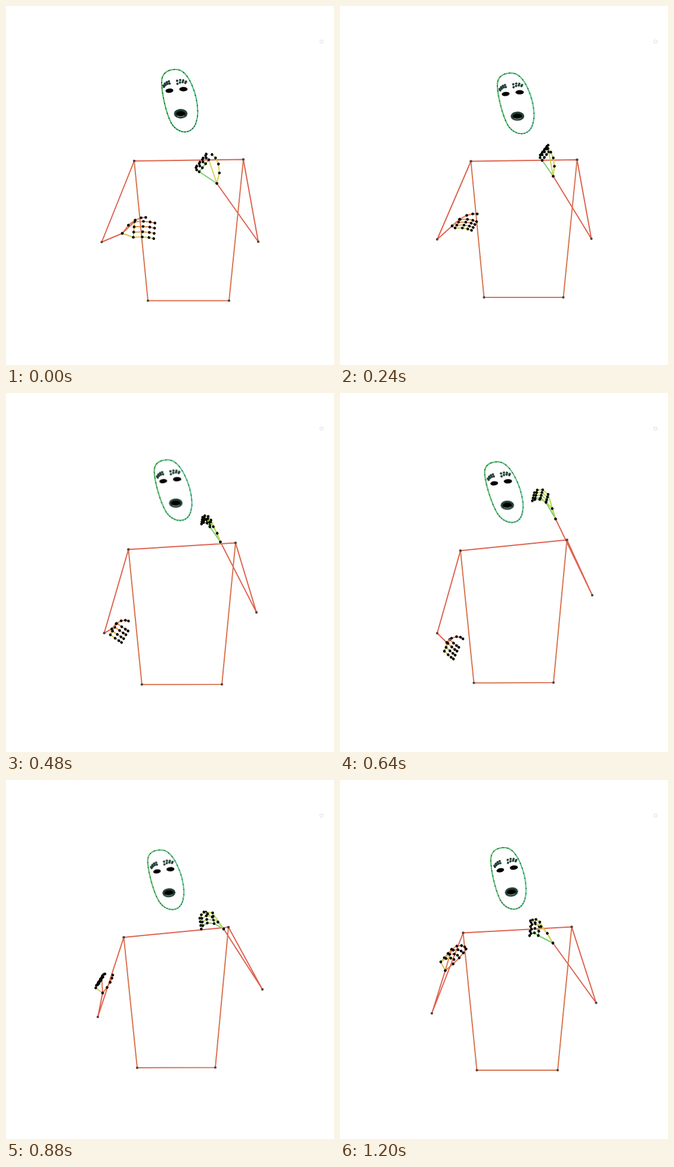
Recreate the animation shown at these times as an HTML page without scripts. Size 550 by 600 pixels, loop 1.28 s.

```html
<!DOCTYPE html>
<html lang="en">
<head>
<meta charset="utf-8">
<title>Signing pose</title>
<style>
html, body { margin: 0; width: 100%; height: 100%; overflow: hidden; background: #fff; }
svg { display: block; width: 550px; height: 600px; }
path { fill: none; stroke-width: 2; stroke-linejoin: round; }

/* Hand rig: wrist, index and pinky knuckles (from the wrist),
   then angle, bend per joint and bone length of fingers and thumb. */
@property --wx { syntax: "<number>"; inherits: true; initial-value: 0; }
@property --wy { syntax: "<number>"; inherits: true; initial-value: 0; }
@property --ix { syntax: "<number>"; inherits: true; initial-value: 0; }
@property --iy { syntax: "<number>"; inherits: true; initial-value: 0; }
@property --px { syntax: "<number>"; inherits: true; initial-value: 0; }
@property --py { syntax: "<number>"; inherits: true; initial-value: 0; }
@property --fa { syntax: "<number>"; inherits: true; initial-value: 0; }
@property --fb { syntax: "<number>"; inherits: true; initial-value: 0; }
@property --fl { syntax: "<number>"; inherits: true; initial-value: 0; }
@property --ta { syntax: "<number>"; inherits: true; initial-value: 0; }
@property --tb { syntax: "<number>"; inherits: true; initial-value: 0; }
@property --tl { syntax: "<number>"; inherits: true; initial-value: 0; }
@property --turn { syntax: "<number>"; inherits: true; initial-value: 0; }

.hand { transform: translate(calc(var(--wx) * 1px), calc(var(--wy) * 1px)); }
.palm { transform: matrix(var(--ix), var(--iy), var(--px), var(--py), 0, 0); stroke: currentColor; vector-effect: non-scaling-stroke; }
.finger {
  --len: var(--fl); --bend: var(--fb);
  transform:
    translate(calc((var(--ix) * (1 - var(--t)) + var(--px) * var(--t)) * 1px),
              calc((var(--iy) * (1 - var(--t)) + var(--py) * var(--t)) * 1px))
    rotate(calc(var(--fa) * 1deg));
}
.thumb { --len: var(--tl); --bend: var(--tb); transform: rotate(calc(var(--ta) * 1deg)); }
.joint { transform: translate(calc(var(--len) * var(--m) * 1px), 0px) rotate(calc(var(--bend) * 1deg)); }
.bone { y: -1px; height: 2px; width: calc(var(--len) * var(--n) * 1px); fill: currentColor; }
.dot { r: 2.3px; fill: #060606; }
.tip { cx: calc(var(--len) * var(--n) * 1px); }

/* Motion runs between key poses; steps hold every 80 ms. */
.left { color: #de8a52; animation: left 1.28s infinite; }
.right { color: #d9cf58; animation: right 1.28s infinite, tint 1.28s steps(8) infinite; }
@keyframes left {
  0% { --wx: 195; --wy: 380; --ix: 20.5; --iy: -19.5; --px: 18.5; --py: 6.5; --fa: -2; --fb: 7; --fl: 15; --ta: -53; --tb: 16; --tl: 14.2; animation-timing-function: steps(3); }
  18.75% { --wx: 188; --wy: 367.5; --ix: 13.5; --iy: -11; --px: 5; --py: 3.5; --fa: 0; --fb: 10; --fl: 12.2; --ta: -42; --tb: 14; --tl: 13.8; animation-timing-function: steps(2); }
  31.25% { --wx: 176.5; --wy: 383; --ix: 10.5; --iy: -11.5; --px: -1.5; --py: 7.5; --fa: 31; --fb: 0; --fl: 10.4; --ta: -55; --tb: 20; --tl: 10; animation-timing-function: steps(3); }
  50% { --wx: 179; --wy: 417; --ix: 5; --iy: -5; --px: -4; --py: 14.5; --fa: 43; --fb: -3; --fl: 8.7; --ta: -42; --tb: 25; --tl: 8.9; animation-timing-function: steps(3); }
  68.75% { --wx: 162; --wy: 356; --ix: -1.5; --iy: -24.5; --px: -11.5; --py: -8.5; --fa: -76; --fb: 28; --fl: 4.3; --ta: -51; --tb: -8; --tl: 10; animation-timing-function: steps(2); }
  81.25% { --wx: 173; --wy: 325.5; --ix: 8; --iy: -34.5; --px: -8; --py: -14; --fa: -37; --fb: 32; --fl: 8.7; --ta: -41; --tb: -6; --tl: 13.7; animation-timing-function: steps(2); }
  93.75%, 100% { --wx: 176.5; --wy: 318.5; --ix: 10.5; --iy: -35.5; --px: -7.5; --py: -14.5; --fa: -32; --fb: 27; --fl: 10.5; --ta: -40; --tb: -5; --tl: 14.4; }
}
@keyframes right {
  0% { --wx: 353.5; --wy: 296.5; --ix: -13.5; --iy: -39.5; --px: -29.5; --py: -19.5; --fa: -145; --fb: 40; --fl: 5.3; --ta: -76; --tb: -20; --tl: 15; animation-timing-function: steps(3); }
  18.75% { --wx: 357.5; --wy: 284.5; --ix: -7.5; --iy: -41; --px: -18.5; --py: -26.5; --fa: -128; --fb: 42; --fl: 5.7; --ta: -83; --tb: -15; --tl: 14; animation-timing-function: steps(2); }
  31.25% { --wx: 358.5; --wy: 268; --ix: -17.5; --iy: -34; --px: -18.5; --py: -24; --fa: -120; --fb: -45; --fl: 5.7; --ta: -112; --tb: -2; --tl: 11.6; animation-timing-function: steps(3); }
  50% { --wx: 361.5; --wy: 210.5; --ix: -12.5; --iy: -41; --px: -16; --py: -27.5; --fa: -140; --fb: -42; --fl: 12; --ta: -108; --tb: -25; --tl: 15.2; animation-timing-function: steps(3); }
  68.75% { --wx: 365; --wy: 249; --ix: -18.5; --iy: -27; --px: -16; --py: -9; --fa: -175; --fb: -35; --fl: 11.5; --ta: -130; --tb: -8; --tl: 12.6; animation-timing-function: steps(2); }
  81.25% { --wx: 359; --wy: 267.5; --ix: -21.5; --iy: -33; --px: -23; --py: -11.5; --fa: -155; --fb: -38; --fl: 8.6; --ta: -122; --tb: -13; --tl: 15.2; animation-timing-function: steps(2); }
  93.75%, 100% { --wx: 357; --wy: 272.5; --ix: -22; --iy: -35; --px: -24.5; --py: -12.5; --fa: -145; --fb: -45; --fl: 7.8; --ta: -120; --tb: -13; --tl: 15.6; }
}
@keyframes tint { 50% { color: #b4d648; } 70% { color: #bfcd66; } }

/* Each posed element supplies its own key values --a to --g. */
.pose { d: var(--a); animation: pose 1.28s infinite; marker: url(#joint); }
.head { transform: var(--a); transform-origin: 291px 158px; animation: move 1.28s infinite; }
@keyframes pose {
  0% { d: var(--a); animation-timing-function: steps(3); }
  18.75% { d: var(--b); animation-timing-function: steps(2); }
  31.25% { d: var(--c); animation-timing-function: steps(3); }
  50% { d: var(--d); animation-timing-function: steps(3); }
  68.75% { d: var(--e); animation-timing-function: steps(2); }
  81.25% { d: var(--f); animation-timing-function: steps(2); }
  93.75%, 100% { d: var(--g); }
}
@keyframes move {
  0% { transform: var(--a); animation-timing-function: steps(3); }
  18.75% { transform: var(--b); animation-timing-function: steps(2); }
  31.25% { transform: var(--c); animation-timing-function: steps(3); }
  50% { transform: var(--d); animation-timing-function: steps(3); }
  68.75% { transform: var(--e); animation-timing-function: steps(2); }
  81.25% { transform: var(--f); animation-timing-function: steps(2); }
  93.75%, 100% { transform: var(--g); }
}
.head {
  --a: matrix(1, 0, 0, 1, 0, 0);
  --b: matrix(1, 0, .02, .971, 3.5, 4.5);
  --c: matrix(1, 0, .04, .971, -8.2, 2.5);
  --d: matrix(.99, 0, .085, .971, -16, 7.5);
  --e: matrix(.965, 0, .045, .955, -23, 8.5);
  --f: matrix(.97, 0, .01, .98, -12, 6.5);
  --g: matrix(.97, 0, .01, .985, -8.7, 6.2);
}

/* The features drift and tilt steadily as the head turns. */
.features {
  transform-origin: 286px 150px;
  transform: translate(calc(var(--turn) * 1px), calc(var(--turn) * .6px)) skewY(calc(var(--turn) * -1.5deg));
  animation: turn 1.28s steps(16) infinite;
}
@keyframes turn { to { --turn: 3.4; } }

.beads { fill: none; stroke: #21503b; stroke-width: 4.4; stroke-linecap: round; stroke-dasharray: .001 1; }
.features .beads { stroke: #223f37; stroke-width: 4; }
</style>
</head>
<body>
<svg viewBox="0 0 550 600">
  <defs>
    <marker id="joint" markerUnits="userSpaceOnUse" markerWidth="5" markerHeight="5" refX="2.5" refY="2.5"><circle cx="2.5" cy="2.5" r="2.1" fill="#54443f"/></marker>
    <linearGradient id="green" gradientUnits="userSpaceOnUse" x1="261" y1="0" x2="322" y2="0">
      <stop stop-color="#3fb450"/><stop offset="1" stop-color="#42bf83"/>
    </linearGradient>
    <path id="crown" pathLength="24" d="M277 195.5C268 178 261 145 261 127C261 115 268 106 285 106C307 106 321.5 150 321.5 178Q321.5 186 319.5 192"/>
    <path id="jaw" pathLength="12" d="M319.5 192C314 216 289 216 277 195.5"/>
    <g id="finger">
      <rect class="bone" style="--n: 1"/>
      <g class="joint" style="--m: 1; --n: .75">
        <rect class="bone"/>
        <g class="joint" style="--m: .75; --n: .55">
          <rect class="bone"/><circle class="dot"/><circle class="dot tip"/>
        </g>
        <circle class="dot"/>
      </g>
      <circle class="dot"/>
    </g>
    <g id="thumb">
      <rect class="bone" style="--n: 1.2"/>
      <g class="joint" style="--m: 1.2"><use href="#finger"/></g>
      <circle class="dot"/>
    </g>
  </defs>

  <rect x="526.5" y="57" width="5" height="5" rx="1" fill="#fff" stroke="#ddd"/>

  <path class="pose" stroke="#de6450" style="
    --a:path('M195 380 160.5 394.5 215 259 398 256.5 423 394 353.5 296.5');
    --b:path('M188 367.5 163 390 219.5 259.5 397.5 257 421.5 389 357.5 284.5');
    --c:path('M176.5 383 165.5 401 207 260.5 387 253 418.5 381 358.5 268');
    --d:path('M179 417 163 401.5 202 263.5 380.5 245.5 423 338 361.5 210.5');
    --e:path('M162 356 154 396 197.5 263 373 246 430 350 365 249');
    --f:path('M173 325.5 154 391.5 204 257.5 385 245.5 430 367 359 267.5');
    --g:path('M176.5 318.5 154 390 206.5 255.5 388.5 245.5 429.5 372.5 357 272.5')"/>
  <path class="pose" stroke="#d87450" style="
    --a:path('M215 259 238 492.5 374 492.5 398 256.5');
    --b:path('M219.5 259.5 241.5 487 374.5 487 397.5 257');
    --c:path('M207 260.5 229.5 488.5 364 488.5 387 253');
    --d:path('M202 263.5 224.5 484.5 358 484 380.5 245.5');
    --e:path('M197.5 263 220 481 351 480.5 373 246');
    --f:path('M204 257.5 227 484 362 484 385 245.5');
    --g:path('M206.5 255.5 229.5 485 365 485 388.5 245.5')"/>

  <g class="head">
    <g fill="none" stroke="url(#green)"><use href="#crown"/><use href="#jaw"/></g>
    <use class="beads" href="#crown"/><use class="beads" href="#jaw"/>
    <g class="features">
      <path class="beads" pathLength="4" d="M264 133Q269 125 277 126"/>
      <path class="beads" pathLength="4" d="M265 135Q270 127.5 278 130.5"/>
      <path class="beads" pathLength="4" d="M287 125Q298 121 305.5 130"/>
      <path class="beads" pathLength="4" d="M287.5 130Q297 124 304.5 131"/>
      <ellipse cx="274" cy="141.5" rx="6.6" ry="3.6" transform="rotate(-5 274 141.5)"/>
      <ellipse cx="297.5" cy="139" rx="7" ry="3.7"/>
      <ellipse cx="293" cy="180" rx="10.5" ry="6.2"/>
      <ellipse class="beads" cx="293" cy="180" rx="9.5" ry="6" pathLength="18"/>
      <path d="M287 184Q293.5 186 299 183.5" stroke="#b9c4be" style="stroke-width: .8"/>
    </g>
  </g>

  <g class="hand left">
    <path class="palm" d="M1 0L0 1L0 0" color="#d6c05a"/>
    <path class="palm" d="M0 0H1" color="#de7650"/>
    <use class="finger" href="#finger" style="--t: 0"/>
    <use class="finger" href="#finger" style="--t: .33"/>
    <use class="finger" href="#finger" style="--t: .67" color="#dba655"/>
    <use class="finger" href="#finger" style="--t: 1" color="#d6c455"/>
    <use class="thumb" href="#thumb" color="#de7650"/>
  </g>

  <g class="hand right">
    <path class="palm" d="M1 0L0 1L0 0" color="#7bcb70"/>
    <path class="palm" d="M0 0H1"/>
    <use class="finger" href="#finger" style="--t: 0"/>
    <use class="finger" href="#finger" style="--t: .33"/>
    <use class="finger" href="#finger" style="--t: .67" color="#a9cd6a"/>
    <use class="finger" href="#finger" style="--t: 1" color="#7bcb70"/>
    <use class="thumb" href="#thumb"/>
  </g>
</svg>
</body>
</html>
```
